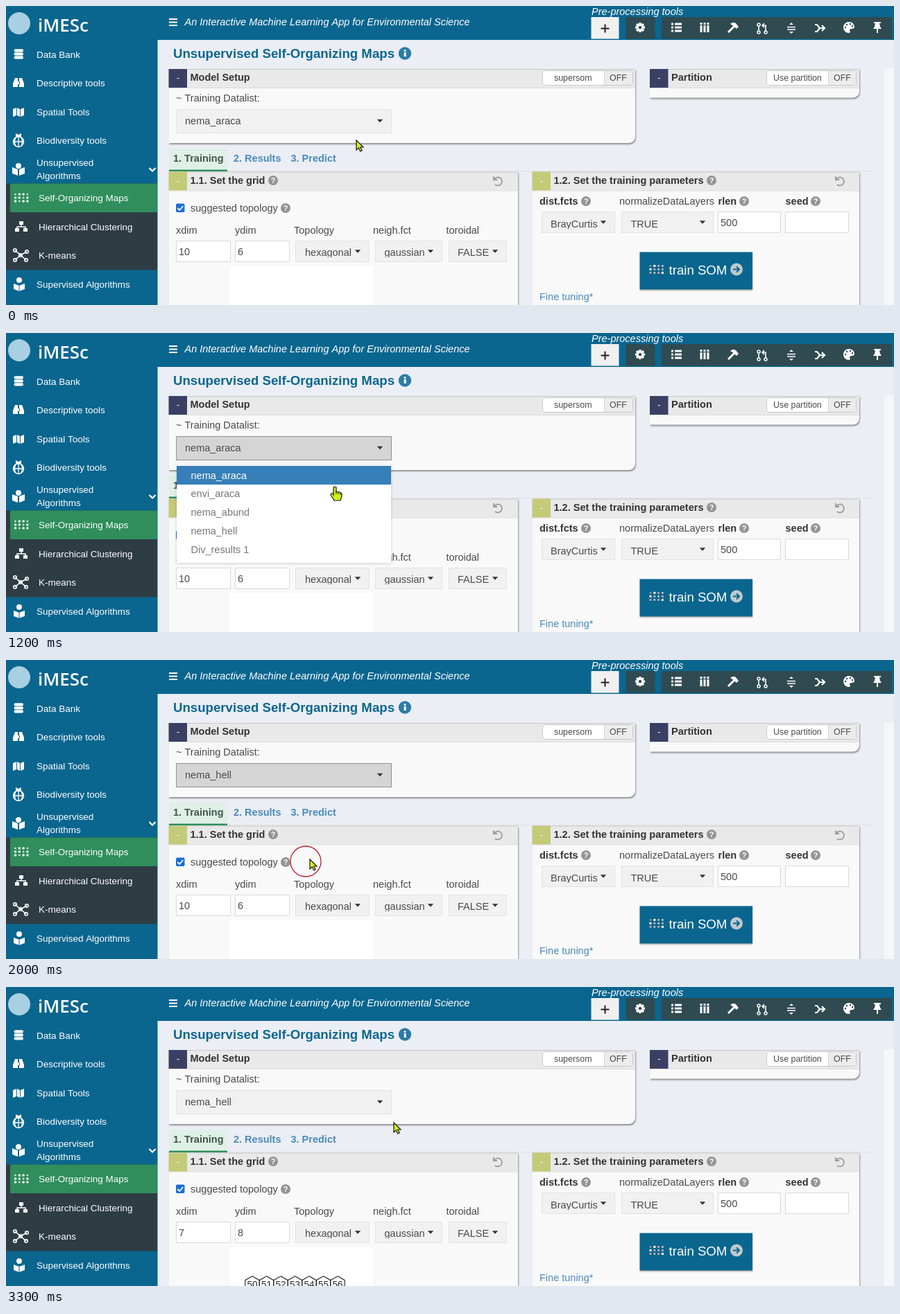
These frames come from a looping animation (1280 px wide and 432 px high, 3400 ms). An HTML page with a canvas:

```html
<!DOCTYPE html>
<html lang="en">
<head>
<meta charset="utf-8">
<title>Self-Organizing Maps setup</title>
<style>
html, body { margin: 0; width: 100%; height: 100%; overflow: hidden; }
canvas { display: block; }
</style>
</head>
<body>
<canvas id="stage" width="1280" height="432"></canvas>
<script>
const ctx = document.getElementById('stage').getContext('2d');
const LOOP = 3400, STEP = 100;
const BLUE = '#0a668f', DARK = '#2e3c44', SLATE = '#2f4a50', GREEN = '#2f8e5b';
const NAVY = '#3a4064', OLIVE = '#c4ca77', LINK = '#4a8abb', INK = '#4a4a4a', BOLD = '#333';
const SMALL = 12.43, MENU = 13.47, BASE = 14.5, LARGE = 18.65;

function box(x, y, w, h, fill, stroke, radius = 0) {
  ctx.beginPath();
  ctx.roundRect(x, y, w, h, radius);
  if (fill) { ctx.fillStyle = fill; ctx.fill(); }
  if (stroke) {
    ctx.beginPath();
    ctx.roundRect(x + 0.5, y + 0.5, w - 1, h - 1, radius);
    ctx.strokeStyle = stroke;
    ctx.lineWidth = 1;
    ctx.stroke();
  }
}

function label(text, x, y, { size = BASE, color = INK, style = '', align = 'left', family = '"Liberation Sans", Arial, sans-serif' } = {}) {
  ctx.font = `${style} ${size}px ${family}`;
  ctx.textAlign = align;
  ctx.fillStyle = color;
  ctx.fillText(text, x, y);
}

const bold = (text, x, y, color = BOLD, size = BASE) => label(text, x, y, { size, color, style: 'bold' });

function dot(x, y, r, color) {
  ctx.beginPath();
  ctx.arc(x, y, r, 0, Math.PI * 2);
  ctx.fillStyle = color;
  ctx.fill();
}

function ring(x, y, r, color, width) {
  ctx.beginPath();
  ctx.arc(x, y, r, 0, Math.PI * 2);
  ctx.strokeStyle = color;
  ctx.lineWidth = width;
  ctx.stroke();
}

function stroke(d, x, y, color = '#fff', width = 2) {
  ctx.save();
  ctx.translate(x, y);
  ctx.strokeStyle = color;
  ctx.lineWidth = width;
  ctx.stroke(new Path2D(d));
  ctx.restore();
}

function fill(d, x, y, color = '#fff') {
  ctx.save();
  ctx.translate(x, y);
  ctx.fillStyle = color;
  ctx.fill(new Path2D(d));
  ctx.restore();
}

function withShadow(blur, dx, dy, color, draw) {
  ctx.save();
  Object.assign(ctx, { shadowBlur: blur, shadowOffsetX: dx, shadowOffsetY: dy, shadowColor: color });
  draw();
  ctx.restore();
}

const caret = (x, y) => fill('M-4.2-2.2H4.2L0 2.2Z', x, y, '#333');

function help(x, y) {
  dot(x, y, 7, '#949494');
  label('?', x, y + 4, { size: 11, color: '#fff', style: 'bold', align: 'center' });
}

function undo(x, y) {
  stroke('M-5-3A6 6 0 1 1-4 5', x, y, '#999', 1.8);
  stroke('M-6-7V-2H-1', x, y, '#999', 1.8);
}

function somDots(x, y, tint = '#fff') {
  for (let row = 0; row < 3; row++)
    for (let col = 0; col < 4; col++)
      dot(x + col * 5.8, y + row * 5, (row + col) % 3 ? 1.8 : 1.2, (row + col) % 2 ? '#fff' : tint);
}

function sidebarIcons() {
  for (const y of [64.5, 69.5, 74.5]) box(11.5, y - 2.2, 13.5, 4.2, '#fff', null, 2);
  fill('M-8 6V1L-5-7H-1V6ZM8 6V1L5-7H1V6ZM-2-2H2V2H-2Z', 18, 111);
  fill('M-8-4L-3-6V5L-8 7ZM-2-6L2-4V7L-2 5ZM3-4L8-6V5L3 7Z', 18, 153);
  ring(18, 196, 7.4, '#fff', 1.6);
  stroke('M-7 0H7M0-7V7M-4-6Q-7 0-4 6M4-6Q7 0 4 6', 18, 196, '#fff', 1.3);
  fill('M-4-9L0-7L4-9V-5L1-3H-1L-4-5Z', 18, 193);
  fill('M-9-3L-1 0V9L-9 6ZM9-3L1 0V9L9 6Z', 18, 236);
  dot(18, 231, 4, '#fff');
  somDots(13.5, 272);
  fill('M-3-8H3V-3H-3ZM-9 2H-3V7H-9ZM3 2H9V7H3Z', 22, 319);
  stroke('M0-3V0M-6 3V0H6V3', 22, 319, '#fff', 1.5);
  stroke('M-8-7L0 0L9-5M0 0L-8 7M0 0L8 7', 21, 360, '#fff', 1.6);
  for (const [x, y] of [[13, 353], [21, 360], [30, 355], [13, 367], [29, 367]]) ring(x, y, 2.3, '#fff', 1.5);
  dot(19, 396, 4, '#fff');
  fill('M-8-1L0 2L8-1V7L0 10L-8 7Z', 19, 402);
  stroke('M0 2V10', 19, 402, BLUE, 1);
  stroke('M-4.5-2L0 2.5L4.5-2', 211, 236, '#fff', 2.2);
}

function sidebar() {
  box(0, 0, 218.5, 432, BLUE);
  box(0, 256.5, 218, 125, DARK);
  box(6, 256.5, 212, 41.5, GREEN);
  dot(19, 25, 16, '#a9cfe2');
  label('iMESc', 46, 36.5, { size: 26, color: '#fff', style: '600', family: '"Open Sans", "Noto Sans", sans-serif' });
  const items = [
    ['Data Bank', 44, 74.5], ['Descriptive tools', 44, 116], ['Spatial Tools', 44, 157.5],
    ['Biodiversity tools', 44, 199], ['Unsupervised', 44, 231], ['Algorithms', 44, 249.5],
    ['Self-Organizing Maps', 47, 282], ['Hierarchical Clustering', 47, 323.5],
    ['K-means', 47, 365], ['Supervised Algorithms', 44, 406.5]
  ];
  for (const [text, x, y] of items) label(text, x, y, { size: MENU, color: '#fff' });
  sidebarIcons();
}

function gear(x, y) {
  ctx.save();
  ctx.translate(x, y);
  for (let i = 0; i < 8; i++) {
    box(-1.7, -7, 3.4, 4, '#fff');
    ctx.rotate(Math.PI / 4);
  }
  ctx.restore();
  ring(x, y, 3.8, '#fff', 3.2);
}

function toolIcons() {
  stroke('M-6 0H6M0-6V6', 863.5, 32.5, '#222', 2);
  gear(914, 31);
  for (const y of [26, 31, 36]) {
    box(959, y - 1.5, 3, 3, '#fff');
    box(964, y - 1.5, 10, 3, '#fff');
  }
  for (const x of [1002, 1007, 1012]) {
    box(x - 1.5, 24, 3, 3, '#fff');
    box(x - 1.5, 28, 3, 10, '#fff');
  }
  stroke('M-7 7L2-2', 1048, 31, '#fff', 3);
  fill('M-4-5Q0-9 4-6L8-1L5 2L1-2Z', 1048, 31);
  stroke('M-5-3V5M1-4H5V5M3-7L0-4L3-1', 1090, 32, '#fff', 1.6);
  for (const [x, y] of [[1085, 27], [1085, 38], [1095, 38]]) ring(x, y, 2, '#fff', 1.5);
  stroke('M-6-1.5H6M-6 2H6', 1132, 32, '#fff', 1.5);
  fill('M-3-5H3L0-8ZM-3 5H3L0 8Z', 1132, 32);
  stroke('M-7-5H-4L0 0H6M-7 5H-4L0 0M3-4L7 0L3 4', 1173, 32, '#fff', 2.2);
  fill('M0-8A8 8 0 1 0 0 8Q3 7 1 4Q1 2 4 2Q8 2 8-1Q7-8 0-8', 1215, 31);
  for (const [x, y] of [[1210, 31], [1212, 27], [1217, 26], [1220, 29]]) dot(x, y, 1.2, SLATE);
  fill('M-5-8H5V-6H3L4-1L6 2H-6L-4-1L-3-6H-5ZM-1 2H1V8H-1Z', 1256, 31);
}

function header() {
  box(218, 0, 1062, 49, BLUE);
  for (const y of [19, 23.5, 28]) box(235, y - 1, 12, 2, '#fff');
  const italic = { color: '#fff', style: 'italic' };
  label('An Interactive Machine Learning App for Environmental Science', 257.5, 28, italic);
  label('Pre-processing tools', 844, 13, italic);
  box(843.5, 16, 40, 31.5, '#f0f0f0');
  box(893.5, 16, 42, 31.5, SLATE);
  box(945, 16, 332, 31.5, SLATE);
  toolIcons();
}

function panel(x, y, w, h, title, titleX, tab) {
  withShadow(2, 1, 2, 'rgba(0,0,0,.38)', () => box(x, y, w, h, '#f9f9f9', null, [0, 0, 9, 0]));
  box(x, y, w, 27, '#e9e9ea');
  box(x, y, w, 1, '#c9c9cb');
  box(x, y + 27, w, 1, '#dcdcdc');
  box(x, y, 26.5, 27, tab);
  label('-', x + 13.5, y + 17, { size: 13, color: '#fff', align: 'center' });
  bold(title, titleX, y + 17);
}

function toggle(x, w, split, text, textX) {
  box(x, 93, w, 22, '#fff', '#c8c8c8', 3);
  box(split, 94, x + w - split - 1, 20, '#ececec', null, [0, 2, 2, 0]);
  box(split, 94, 1, 20, '#d4d4d4');
  label(text, textX, 108, { size: SMALL });
  label('OFF', split + 8, 108, { size: SMALL });
}

function dropdown(text, x, y, w, textX, baseline, caretX, clipY) {
  box(x, y, w, 31, '#f1f1f1', '#e3e3e3');
  ctx.save();
  ctx.beginPath();
  ctx.rect(x, y, w, clipY - y);
  ctx.clip();
  label(text, textX, baseline);
  ctx.restore();
  caret(caretX, y + 15.5);
}

function input(text, x, y, w) {
  box(x, y, w, 31, '#fff', '#d9d9de');
  label(text, x + 4, y + 20.5);
}

function setupPanels(state) {
  bold('Unsupervised Self-Organizing Maps', 241, 75, BLUE, LARGE);
  dot(575, 68.5, 9.2, '#2b7ca8');
  box(573.7, 67, 3, 6, '#fff');
  dot(575, 64.5, 1.6, '#fff');

  panel(234.5, 91, 672.5, 107, 'Model Setup', 265.5, NAVY);
  toggle(773, 131, 862, 'supersom', 790);
  panel(928, 91, 302, 41.5, 'Partition', 959, NAVY);
  toggle(1096, 130, 1185, 'Use partition', 1106);
  label('~ Training Datalist:', 245, 138);
  const [face, edge] = { idle: ['#f1f1f1', '#e3e3e3'], hover: ['#ebebeb', '#8f8f8f'], open: ['#d5d5d5', '#909090'] }[state.select];
  box(245, 149, 311, 35, face, edge);
  label(state.choice, 258, 171);
  caret(539, 166);
}

function tabs() {
  box(234, 238, 1018, 1, '#dddfe5');
  box(235, 206, 84, 33, '#dff0e6', null, [3, 3, 0, 0]);
  box(235, 236.5, 84, 2.5, GREEN);
  bold('1. Training', 241, 225, '#40554b');
  bold('2. Results', 328, 225, LINK);
  bold('3. Predict', 410.5, 225, LINK);
}

function hexRow() {
  const pitch = 20.5, r = pitch / Math.sqrt(3), cy = 429.6;
  for (let i = 0; i < 7; i++) {
    const cx = 355 + i * pitch;
    ctx.beginPath();
    for (let k = 0; k < 6; k++) {
      const a = k * Math.PI / 3;
      ctx.lineTo(cx + r * Math.sin(a), cy - r * Math.cos(a));
    }
    ctx.closePath();
    ctx.strokeStyle = '#222';
    ctx.lineWidth = 1.1;
    ctx.stroke();
    label(String(50 + i), cx, 434, { size: 13.5, color: '#222', align: 'center' });
  }
}

function gridPanel(state) {
  panel(234.5, 239.5, 503.5, 220, '1.1. Set the grid', 265.5, OLIVE);
  help(385, 252);
  undo(709, 253);
  box(245, 285.5, 12.5, 12.5, '#1a6fd4', null, 2);
  stroke('M-4 0L-1 3L4-3', 251.2, 292, '#fff', 1.8);
  label('suggested topology', 266, 297);
  help(403, 292);
  const names = { xdim: 245, ydim: 330, Topology: 415, 'neigh.fct': 529, toroidal: 634.5 };
  for (const name in names) label(name, names[name], 328.5);
  input(state.dims[0], 245, 339, 79);
  input(state.dims[1], 330, 339, 79);
  dropdown('hexagonal', 417, 339, 107, 431, 361, 507, 363);
  dropdown('gaussian', 532, 339, 97, 545.5, 361, 612, 363);
  dropdown('FALSE', 638, 339, 84, 651, 361, 705, 363);
  box(322, 376, 207, 56, '#fff');
  if (state.hexes) hexRow();
}

function paramsPanel() {
  panel(758.5, 239.5, 471.5, 220, '1.2. Set the training parameters', 789.5, OLIVE);
  help(1017, 252);
  undo(1202, 253);
  bold('dist.fcts', 769, 287);
  label('normalizeDataLayers', 884, 287);
  bold('rlen', 1026.5, 287);
  bold('seed', 1123.5, 287);
  for (const x of [836, 1064, 1167]) help(x, 282);
  dropdown('BrayCurtis', 772, 297, 106, 785, 319.5, 861, 322);
  dropdown('TRUE', 887, 297, 133, 900.5, 319.5, 1004, 322);
  input('500', 1026, 297, 91);
  input('', 1123, 297, 92);
  withShadow(2, 0, 1, 'rgba(0,0,0,.35)', () => box(913.5, 355.5, 162.5, 54, BLUE));
  somDots(929, 375.5, '#c39a9a');
  label('train SOM', 955.5, 387.5, { size: LARGE, color: '#fff' });
  dot(1053, 380.5, 9, '#bfc9ce');
  stroke('M-5 0H4M0-4L4 0L0 4', 1053, 380.5, BLUE, 2);
  label('Fine tuning*', 769, 425, { color: LINK });
}

function menu(hovered) {
  withShadow(4, 0, 1, 'rgba(0,0,0,.18)', () => box(246, 191, 309, 141, '#fff'));
  box(246, 192, 309, 27, '#377fb8');
  if (hovered) box(246, 192 + hovered * 27, 309, 27, '#dedee0');
  ['nema_araca', 'envi_araca', 'nema_abund', 'nema_hell', 'Div_results 1'].forEach((item, i) =>
    label(item, 266.5, 210.5 + i * 26.9, { color: i ? '#777' : '#fff' }));
}

const ease = {
  in: u => u * u,
  out: u => 1 - (1 - u) * (1 - u),
  both: u => u * u * (3 - 2 * u)
};

// Pointer tip: time, x, y, easing of the way there.
const path = [
  [0, 505, 194, 'both'], [600, 505, 194, 'both'], [700, 504, 177, 'out'], [800, 504, 174, 'out'],
  [900, 504, 174, 'both'], [1200, 474, 222, 'in'], [1400, 433, 291, 'out'], [1500, 432, 291, 'out'],
  [1800, 432, 291, 'both'], [2000, 438, 288, 'in'], [2400, 559, 196, 'both'], [LOOP, 559, 196, 'both']
];

function pointerAt(t) {
  const i = Math.max(1, path.findIndex(key => key[0] >= t));
  const [t0, x0, y0] = path[i - 1], [t1, x1, y1, kind] = path[i];
  const u = ease[kind]((t - t0) / (t1 - t0));
  return [x0 + (x1 - x0) * u, y0 + (y1 - y0) * u];
}

const arrow = 'M0 0V14L3.3 11L5.8 16L8.2 14.8L5.8 10H10Z';
const hand = 'M0 0Q2 0 2 2V7L7 8Q10 9 10 11V14Q9 17 8 20H-1Q-3 16-6 12Q-6 9-3 10L-2 12V2Q-2 0 0 0Z';

function pointer(x, y, isHand) {
  const shape = isHand ? hand : arrow;
  fill(shape, x, y, '#d3f01c');
  stroke(shape, x, y, '#151515', 1.2);
  if (isHand) stroke('M2 7V11M5 8V11M8 9V12', x, y, '#151515', 1);
}

function clickRing(t, x, y, start) {
  const age = t - start;
  if (age > 0 && age <= 225) ring(x, y, 0.125 * age, '#c01a2b', 1.3);
}

function stateAt(t) {
  const open = t >= 900 && t < 1900, updated = t >= 2200;
  return {
    open,
    choice: t < 1900 ? 'nema_araca' : 'nema_hell',
    select: t < 700 || updated ? 'idle' : t < 900 ? 'hover' : 'open',
    hovered: t < 1300 ? 0 : t < 1400 ? 2 : 3,
    dims: updated ? ['7', '8'] : ['10', '6'],
    hexes: t >= 2300
  };
}

function draw(t) {
  const state = stateAt(t);
  box(0, 0, 1280, 432, '#ebeef4');
  box(1266, 90, 14, 342, '#f6f6f8');
  sidebar();
  header();
  setupPanels(state);
  tabs();
  gridPanel(state);
  paramsPanel();
  if (state.open) menu(state.hovered);
  clickRing(t, 505, 175, 584);
  clickRing(t, 432, 291, 1824);
  const [x, y] = pointerAt(t);
  pointer(x, y, t >= 700 && t < 1900);
}

function tick(now) {
  draw(Math.floor((now % LOOP) / STEP) * STEP);
  requestAnimationFrame(tick);
}
requestAnimationFrame(tick);
</script>
</body>
</html>
```
